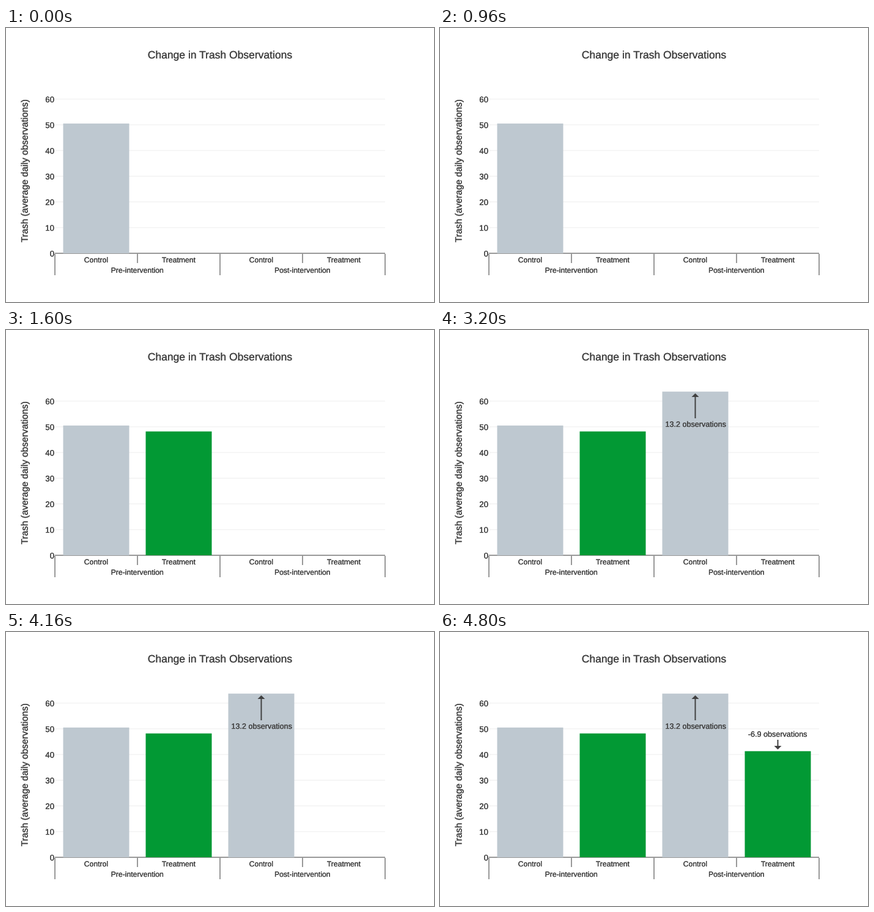
Write a matplotlib script that moves like this. It is 700x450 px and loops after 6400 ms.

```python
import matplotlib.pyplot as plt
from matplotlib.animation import FuncAnimation
from matplotlib.patches import Polygon, Rectangle
from matplotlib.patheffects import withStroke

WIDTH, HEIGHT, DPI = 700, 450, 100
PX = 72 / DPI
LEFT, BASE, SLOT, UNIT = 80, 370, 135, 4.22
RIGHT = LEFT + 4 * SLOT
INK, GRAY, GREEN = "#414141", "#bec8d0", "#029934"
AXIS, GRID = "#999999", "#eeeeee"
VALUES = [50.5, 48.2, 63.7, 41.3]

plt.rcParams["font.family"] = "Liberation Sans"
fig = plt.figure(figsize=(WIDTH / DPI, HEIGHT / DPI), dpi=DPI, facecolor="white")
ax = fig.add_axes([0, 0, 1, 1])
ax.set(xlim=(0, WIDTH), ylim=(HEIGHT, 0))
ax.axis("off")


def label(x, y, text, size, ha="center", **kwargs):
    """Slightly emboldened text; y is the baseline, size is in pixels."""
    return ax.text(x, y, text, fontsize=size * PX, color=INK, ha=ha,
                   va=kwargs.pop("va", "baseline"), zorder=5,
                   path_effects=[withStroke(linewidth=0.15, foreground=INK)],
                   **kwargs)


def line(x0, y0, x1, y1, color, width):
    ax.plot([x0, x1], [y0, y1], color=color, lw=width * PX,
            solid_capstyle="butt", snap=False, zorder=1)


def bar(slot, value):
    x = LEFT + SLOT * slot + 13.5
    color = GREEN if slot % 2 else GRAY
    return ax.add_patch(Rectangle((x, BASE - value * UNIT), 108, value * UNIT,
                                  fc=color, lw=0, zorder=2, snap=False))


def arrow(x, tail, tip):
    neck = tip + (6 if tail > tip else -6)
    points = [(x - 1, tail), (x - 1, neck), (x - 6, neck), (x, tip),
              (x + 6, neck), (x + 1, neck), (x + 1, tail)]
    return ax.add_patch(Polygon(points, fc=INK, lw=0, zorder=4))


label(350, 50, "Change in Trash Observations", 17.5)
label(31.5, 235, "Trash (average daily observations)", 15.3,
      rotation=90, va="center")

for tick in range(0, 70, 10):
    y = BASE - tick * UNIT
    if tick:
        line(LEFT, y, RIGHT, y, GRID, 1)
    label(79, y + 5.2, str(tick), 13.3, ha="right")

line(LEFT, BASE, RIGHT, BASE, AXIS, 2)
for i in range(5):
    x = LEFT + SLOT * i
    line(x, BASE + 1, x, 386 if i % 2 else 406, AXIS, 2)
for i in range(4):
    label(LEFT + SLOT * (i + 0.5), 385, ("Control", "Treatment")[i % 2], 12.2)
for x, name in ((215, "Pre-intervention"), (485, "Post-intervention")):
    label(x, 402, name, 12.2)

stages = [[bar(i, value)] for i, value in enumerate(VALUES)]
stages[2] += [arrow(417.5, 145, 104), label(418.5, 159, "13.2 observations", 12.6)]
stages[3] += [arrow(552.5, 177, 193), label(552.5, 172, "-6.9 observations", 12.6)]


def update(frame):
    for i, artists in enumerate(stages):
        for artist in artists:
            artist.set_visible(i <= frame)
    return sum(stages, [])


animation = FuncAnimation(fig, update, frames=4, interval=1600,
                          repeat=True, repeat_delay=0)
plt.show()
```
